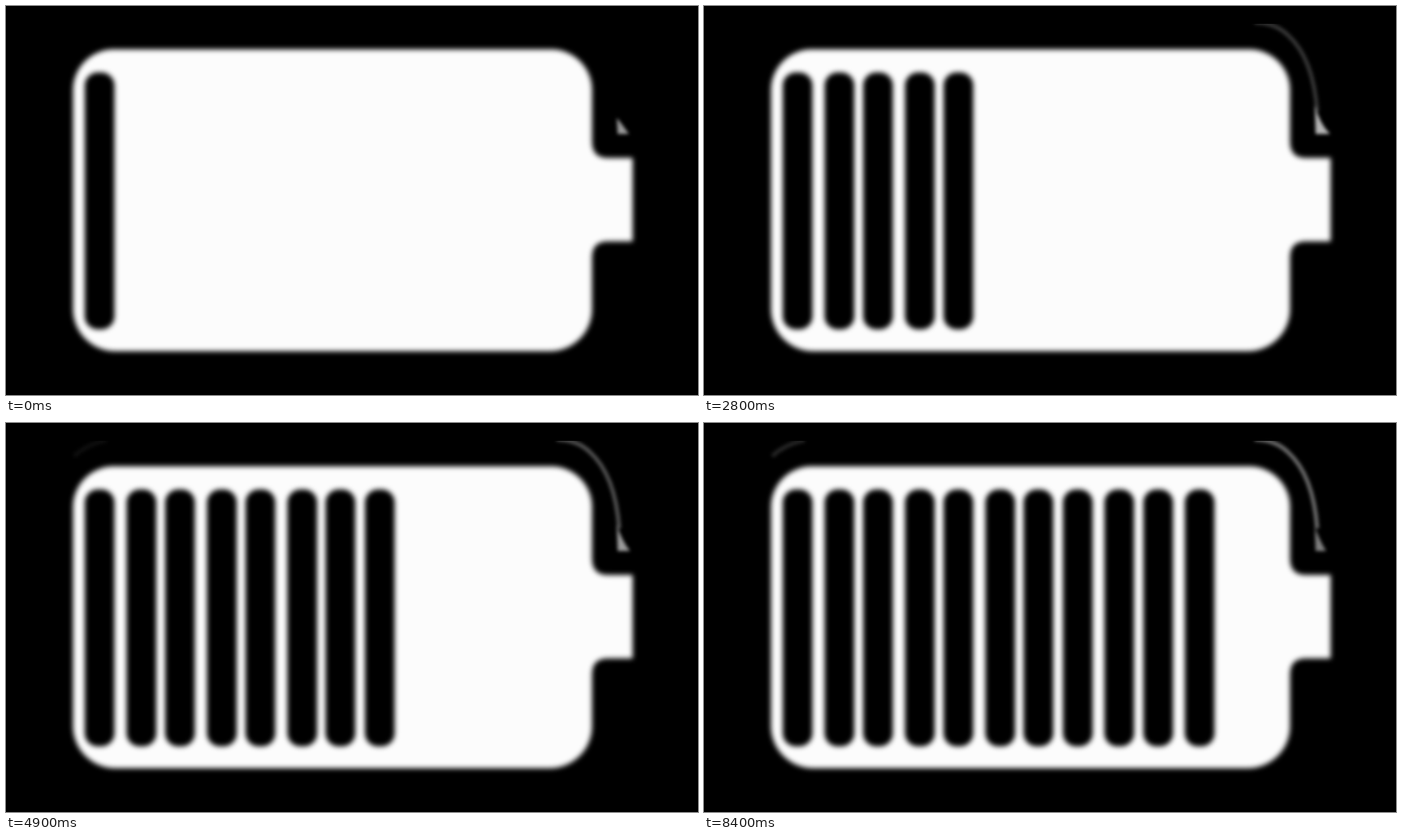
An HTML page for the animation above (8500 ms loop, 852 by 480 pixels).

```html
<!DOCTYPE html>
<html>
<head>
<meta charset="utf-8">
<style>
  html, body { margin: 0; width: 100%; height: 100%; overflow: hidden; background: #000; }
  svg { display: block; width: 100vw; height: 100vh; }
  .soft { filter: blur(3.1px); }
  .glint { filter: blur(2.3px); }
</style>
</head>
<body>
<svg viewBox="0 0 852 480">
  <clipPath id="below"><rect y="22" width="852" height="458"/></clipPath>
  <g class="soft">
    <path fill="#fcfcfc" d="M132 53.5H672A50 50 0 0 1 721.5 103V168Q722 187.5 741 187.5H771.5V290.5H741Q721.5 290.5 721.5 310V374
      A52 52 0 0 1 669.5 426H134.5A52 52 0 0 1 82.5 374V103A50 50 0 0 1 132 53.5Z"/>
    <g id="bars"></g>
  </g>
  <g clip-path="url(#below)">
    <g class="glint">
      <path id="arc" fill="none" stroke="#fff" stroke-width="5" d="M678 20Q704 21 719 36Q750 64 755 130"/>
      <path id="leftArc" fill="none" stroke="#fff" stroke-width="5" d="M84 41Q98 27 124 21"/>
      <path id="wedge" fill="#fff"/>
    </g>
  </g>
</svg>
<script>
const LOOP = 8500, STEP = 700;
const BAR_LEFTS = [97, 148.5, 196, 247.5, 295, 346.5, 393.5, 442, 493, 541, 592];
const byId = id => document.getElementById(id);

const bars = BAR_LEFTS.map(x => {
  const bar = document.createElementNS('http://www.w3.org/2000/svg', 'rect');
  const shape = { x, y: 82, width: 36.5, height: 317, rx: 16 };
  for (const key in shape) bar.setAttribute(key, shape[key]);
  return byId('bars').appendChild(bar);
});

function draw(now) {
  const time = now % LOOP;
  const step = Math.min(Math.floor(time / STEP), bars.length - 1);
  bars.forEach((bar, i) => bar.setAttribute('visibility', i <= step ? 'visible' : 'hidden'));

  // The faint rim brightens as the battery fills, while the wedge below it shrinks.
  byId('arc').setAttribute('opacity', step ? 0.08 + 0.035 * step : 0);
  byId('leftArc').setAttribute('opacity', Math.max(0, step - 5) * 0.03);
  const tip = step ? 118 + step : 138;
  const right = step ? 774 - 0.8 * step : 767;
  byId('wedge').setAttribute('d', `M752 ${tip}L753 158H${right}Q758 145 752 ${tip}Z`);
  byId('wedge').setAttribute('opacity', step ? 0.85 - 0.035 * step : 0.6);
  requestAnimationFrame(draw);
}
requestAnimationFrame(draw);
</script>
</body>
</html>
```
